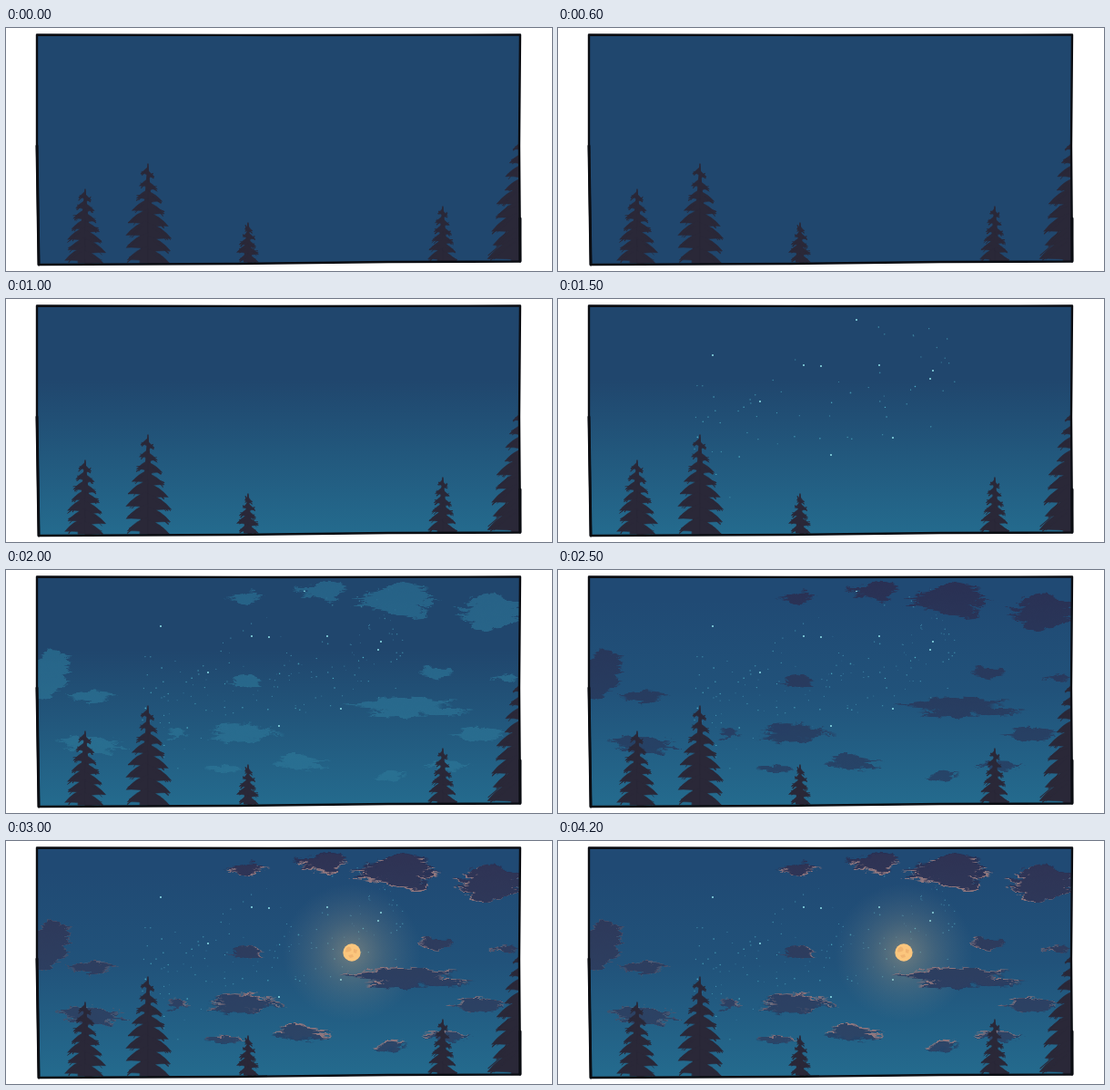
Recreate the animation shown at these times as an HTML page. Size 600x268 px, loop 5000 ms.

```html
<!DOCTYPE html>
<html lang="en">
<head>
<meta charset="utf-8">
<title>Night sky</title>
<style>
html, body { margin: 0; width: 100%; height: 100%; overflow: hidden; background: #fff; }
svg { display: block; width: 100vw; height: 100vh; }
</style>
</head>
<body>
<svg viewBox="0 0 600 268">
  <defs>
    <clipPath id="panel"><path d="M34 7H564V258L36 261Z"/></clipPath>
    <linearGradient id="dusk" gradientUnits="userSpaceOnUse" x1="0" y1="8" x2="0" y2="260">
      <stop offset=".32" stop-color="#20466d"/>
      <stop offset="1" stop-color="#246b8e"/>
    </linearGradient>
    <linearGradient id="night" gradientUnits="userSpaceOnUse" x1="0" y1="8" x2="0" y2="260">
      <stop offset=".1" stop-color="#204a74"/>
      <stop offset=".5" stop-color="#21527a"/>
      <stop offset="1" stop-color="#246b8e"/>
    </linearGradient>
    <linearGradient id="teal" gradientUnits="userSpaceOnUse" x1="0" y1="8" x2="0" y2="240">
      <stop stop-color="#29678b"/><stop offset="1" stop-color="#2b7394"/>
    </linearGradient>
    <linearGradient id="navy" gradientUnits="userSpaceOnUse" x1="0" y1="8" x2="0" y2="240">
      <stop stop-color="#2b2f52"/><stop offset="1" stop-color="#274468"/>
    </linearGradient>
    <radialGradient id="halo">
      <stop offset=".1" stop-color="#b9a786" stop-opacity=".42"/>
      <stop offset=".45" stop-color="#a09884" stop-opacity=".24"/>
      <stop offset="1" stop-color="#7a8790" stop-opacity="0"/>
    </radialGradient>
    <filter id="brush" filterUnits="userSpaceOnUse" x="0" y="0" width="600" height="268" color-interpolation-filters="sRGB">
      <feTurbulence type="fractalNoise" baseFrequency=".06 .14" numOctaves="3" seed="4"/>
      <feDisplacementMap in="SourceGraphic" scale="12" xChannelSelector="R" yChannelSelector="G"/>
    </filter>
  </defs>
  <g clip-path="url(#panel)">
    <rect width="600" height="268" fill="#20476e"/>
    <rect id="duskSky" width="600" height="268" fill="url(#dusk)"/>
    <rect id="nightSky" width="600" height="268" fill="url(#night)"/>
    <g id="stars" fill="#4fb0c6"></g>
    <g id="dust" fill="#4799b8"></g>
    <circle id="glow" cx="380" cy="123" r="76" fill="url(#halo)"/>
    <g id="tealClouds" fill="url(#teal)" filter="url(#brush)" opacity=".85"></g>
    <g id="rims" fill="#8f767d" filter="url(#brush)"></g>
    <g id="navyClouds" fill="url(#navy)" filter="url(#brush)" opacity=".95"></g>
    <g id="moon">
      <circle cx="380" cy="123" r="9.7" fill="#fbc67d"/>
      <path d="M374 118q3-3 5 0t-2 4-4 0zM382 119l4 1-1 4-3-1zM376 126l5-1 1 3-4 1z" fill="#eaa968" opacity=".6"/>
    </g>
    <g id="trees" fill="#2a2838" stroke="#2a2838" stroke-linecap="round"></g>
  </g>
  <g fill="none" stroke="#0b0d12" stroke-linecap="round" stroke-linejoin="round">
    <path d="M34 7.5L300 8 565 7.5L564 130 565 257.5 420 258 250 260 36 261 34 130Z" stroke-width="2.4"/>
    <path d="M565 210V257M34 130L36 261" stroke-width="3"/>
  </g>
</svg>
<script>
const LOOP = 5000;
const MOON = { x: 380, y: 123 };
const byId = id => document.getElementById(id);

function add(parent, tag, attrs) {
  const node = document.createElementNS("http://www.w3.org/2000/svg", tag);
  for (const key in attrs) node.setAttribute(key, attrs[key]);
  byId(parent).appendChild(node);
}

let seed = 17;
function rand(min = 0, max = 1) {
  seed = (seed * 16807) % 2147483647;
  return min + (max - min) * seed / 2147483647;
}

// Stars gather around a band rising to the right
function scatter(layer, count, minR, maxR) {
  for (let i = 0; i < count; i++) {
    const cx = rand(150, 440);
    const cy = 165 - (cx - 150) * .36 + rand(-45, 45) + rand(-35, 35);
    add(layer, "circle", { cx, cy, r: rand(minR, maxR), opacity: rand(.5, 1) });
  }
}
scatter("stars", 62, .5, .85);
scatter("dust", 100, .4, .65);

const brightest = [[170, 62], [222, 113], [270, 73], [289, 74], [300, 172], [328, 23],
  [353, 73], [368, 153], [409, 88], [412, 79]];
for (const [cx, cy] of brightest) add("stars", "circle", { cx, cy, r: 1, fill: "#8ee0ea" });

// A cloud is a stack of lens-shaped streaks inside an ellipse
function cloudPath(x, y, w, h) {
  const rows = Math.round(3 + h / 6);
  let d = "";
  for (let i = 0; i < rows; i++) {
    const v = (2 * i + 1) / rows - 1;
    const half = w / 2 * Math.sqrt(1 - v * v) * rand(.65, 1);
    const cx = x + rand(-.12, .12) * w, cy = y + v * h * .42;
    const bulge = h / rows * rand(1.3, 2.1);
    d += `M${cx - half} ${cy}Q${cx} ${cy - bulge} ${cx + half} ${cy}Q${cx} ${cy + bulge} ${cx - half} ${cy}Z`;
  }
  return d;
}

// Moonlight shows as a paler copy peeking out on the side facing the moon
function addCloud([x, y, w, h]) {
  const d = cloudPath(x, y, w, h);
  add("tealClouds", "path", { d });
  add("navyClouds", "path", { d });
  const dx = MOON.x - x, dy = MOON.y - y, distance = Math.hypot(dx, dy);
  const shift = 3.2 * Math.max(0, 1 - distance / 330);
  const move = `translate(${dx / distance * shift} ${dy / distance * shift})`;
  add("rims", "path", { d, transform: move });
}

// Centre x, centre y, width, height
const clouds = [
  [265, 31, 46, 15], [350, 23, 68, 22], [435, 33, 96, 44], [532, 46, 88, 46],
  [48, 115, 60, 62], [88, 140, 66, 13], [265, 124, 48, 14], [442, 151, 146, 25],
  [472, 113, 50, 14], [549, 119, 34, 9], [258, 180, 108, 22], [95, 193, 90, 22],
  [322, 212, 76, 17], [517, 181, 76, 16], [422, 226, 38, 11], [485, 216, 58, 9],
  [238, 220, 58, 6], [188, 181, 36, 7]
];
clouds.forEach(addCloud);

// Drooping branches widen towards the ground, alternating sides
function tree(x, top, base, reach) {
  const height = base - top;
  const rows = Math.round(3 + height / 22);
  const gap = height / rows;
  add("trees", "path", {
    d: `M${x} ${top}L${x + reach * .34} ${base}H${x - reach * .34}Z`, "stroke-width": 1
  });
  for (let i = 0; i < rows; i++) {
    for (const side of [-1, 1]) {
      const tipY = top + gap * (i + .9 + side * .13);
      const t = (tipY - top) / height;
      const span = side * reach * Math.min(1, .2 + 1.05 * t) * rand(.82, 1.06);
      const tipX = x + span, rootY = tipY - Math.abs(span) * .55;
      add("trees", "path", {
        d: `M${x} ${rootY - 3}Q${x + span * .6} ${rootY + 1} ${tipX} ${tipY}` +
           `Q${x + span * .55} ${tipY - 1} ${x} ${tipY + 2}Z`,
        "stroke-width": .5
      });
      for (let k = 0; k < 4; k++) {
        const start = rand(.2, .55), drop = rand(-4, 3);
        add("trees", "path", {
          d: `M${x + span * start} ${rootY + 3}L${x + span * rand(.7, 1)} ${tipY + drop}`,
          "stroke-width": rand(.5, 1.3)
        });
      }
    }
  }
}
tree(87, 178, 259, 22);
tree(156, 150, 259, 25);
tree(266, 215, 258, 12);
tree(480, 197, 257, 16);
tree(568, 122, 258, 37);

const timeline = [
  ["duskSky", 1000], ["stars", 1500], ["dust", 2000], ["tealClouds", 2000, 2500],
  ["nightSky", 2500], ["navyClouds", 2500], ["glow", 3000], ["rims", 3000], ["moon", 3000]
];
for (const [id, from, to = LOOP] of timeline) {
  const step = (time, visibility) => ({ offset: time / LOOP, visibility, easing: "step-end" });
  const end = to < LOOP ? [step(to, "hidden"), step(LOOP, "hidden")] : [step(LOOP, "visible")];
  const player = byId(id).animate(
    [step(0, "hidden"), step(from, "visible"), ...end],
    { duration: LOOP, iterations: Infinity }
  );
  player.startTime = 0;
}
</script>
</body>
</html>
```
